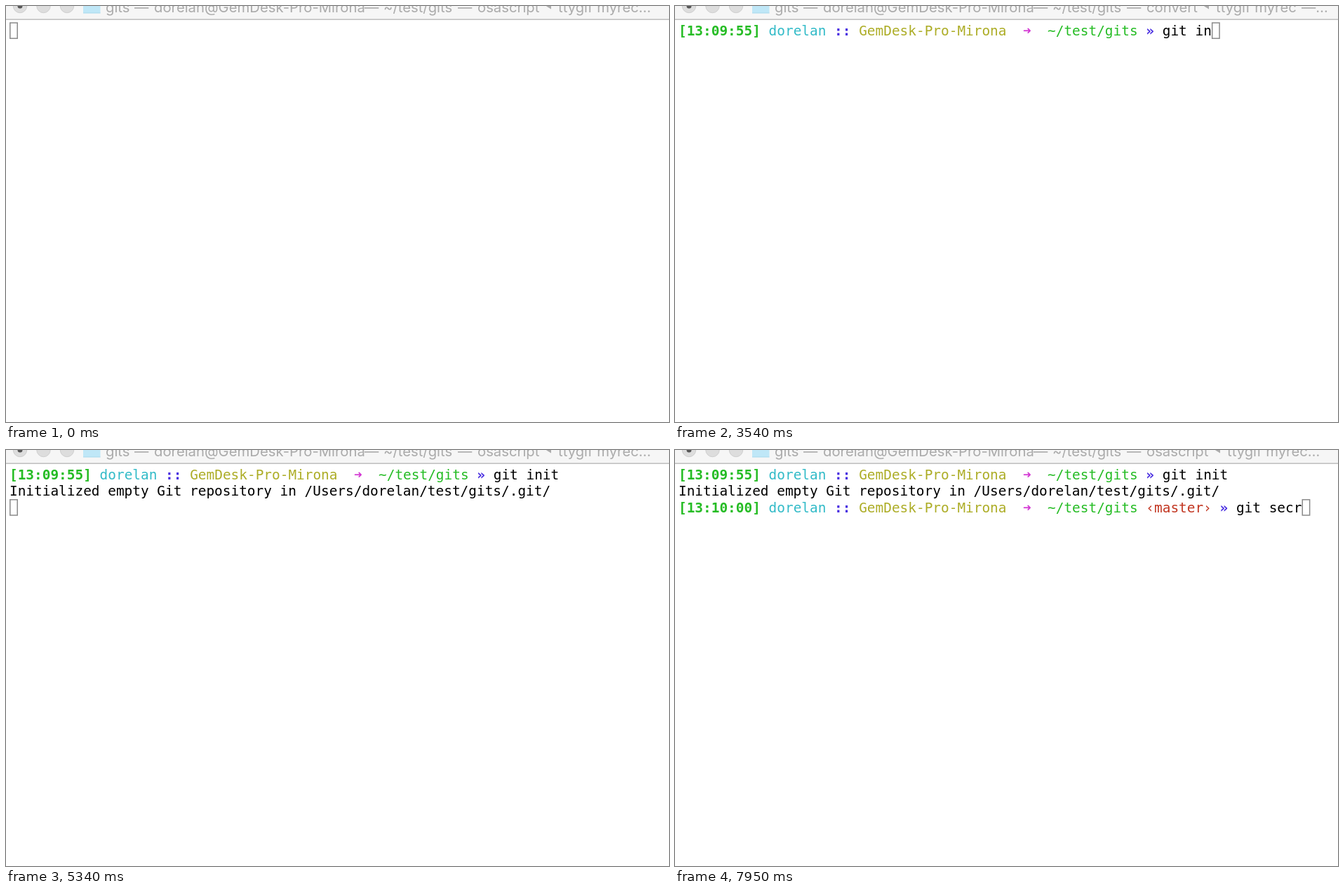
Animation of 945x593 px, one loop 8 s. Source, as an HTML page with a canvas:

```html
<!DOCTYPE html>
<html lang="en">
<head>
<meta charset="utf-8">
<title>Terminal session</title>
<style>
  html, body { margin: 0; width: 100%; height: 100%; overflow: hidden; background: #fff; }
  canvas { display: block; width: 945px; height: 593px; }
</style>
</head>
<body>
<canvas id="stage"></canvas>
<script>
const LOOP = 8000, WIDTH = 945, HEIGHT = 593;
const LEFT = 5, CELL = 11.69, ROW = 23.4;
const USER = 'dorelan', HOST = 'GemDesk-Pro-Mirona';
const MONO = '19.42px "DejaVu Sans Mono", monospace';
const SANS = '20.3px Inter, sans-serif';
const COLOR = {
  green: '#25bc24', cyan: '#33bbc8', blue: '#492ee1', yellow: '#adad27',
  magenta: '#d338d3', red: '#c23621', black: '#000'
};

const canvas = document.getElementById('stage');
const ctx = canvas.getContext('2d');
const ratio = window.devicePixelRatio || 1;
canvas.width = WIDTH * ratio;
canvas.height = HEIGHT * ratio;

// Each schedule lists [start time, value]; the last one reached applies.
const titleSchedule = [
  [0, 'osascript'], [2780, 'convert'], [2950, 'osascript'], [3160, 'sh'],
  [3540, 'convert'], [3710, 'osascript'], [3830, 'convert'], [4120, 'sh'],
  [4840, 'osascript'], [4940, 'init'], [5040, 'osascript'], [5660, 'convert'],
  [6490, 'sh'], [6680, 'convert'], [6870, 'osascript'], [7100, 'convert'],
  [7380, 'osascript'], [7660, 'convert'], [7950, 'osascript']
];
const firstCommand = { text: 'git init', keys: [300, 2780, 2950, 3160, 3360, 3540, 3710, 3830] };
const secondCommand = { text: 'git secr', keys: [5660, 6490, 6680, 6870, 7100, 7380, 7660, 7950] };

// Window titles: text pieces with their x, and the x of the small arrow.
const place = [[142, 'gits'], [183, '—'], [211, `${USER}@${HOST}`],
  [511, '—'], [538, '~/test/gits'], [644, '—']];
const titles = {
  osascript: { folder: 110, arrow: 769, parts: [...place, [672, 'osascript'], [787, 'ttygif myrec…']] },
  convert: { folder: 110, arrow: 753, parts: [...place, [672, 'convert'], [771, 'ttygif myrec'], [893, '—…']] },
  sh: { folder: 110, arrow: 702, parts: [...place, [672, 'sh'], [720, 'ttygif myrec'], [842, '—'], [870, '80×…']] },
  init: { folder: 171, arrow: 531, parts: [[204, 'gits'], [247, '—'], [275, 'git init'], [343, '—'],
    [371, 'git'], [402, '—'], [430, 'osascript'], [548, 'ttygif myrec'], [675, '—'], [703, '80×24']] }
};

const valueAt = (schedule, time) => schedule.filter(([start]) => start <= time).pop()[1];
const typed = ({ text, keys }, time) => text.slice(0, keys.filter(key => key <= time).length);

function drawTitleBar(title) {
  ctx.fillStyle = '#f6f6f6';
  ctx.fillRect(0, 0, WIDTH, 18.5);
  ctx.fillStyle = '#b2b2b2';
  ctx.fillRect(0, 18.5, WIDTH, 1.3);

  for (const x of [20, 53.5, 87]) {
    ctx.beginPath();
    ctx.arc(x, 0, 9.7, 0, Math.PI * 2);
    ctx.fillStyle = '#dddddd';
    ctx.fill();
    ctx.strokeStyle = '#cecece';
    ctx.lineWidth = 1;
    ctx.stroke();
  }
  ctx.fillStyle = '#555';
  ctx.beginPath();
  ctx.arc(20, 0, 3.5, 0, Math.PI * 2);
  ctx.fill();

  ctx.fillStyle = '#bfe7f7';
  ctx.fillRect(title.folder, 0, 24.5, 10.3);
  ctx.fillStyle = '#a9d7ea';
  ctx.fillRect(title.folder, 9.5, 24.5, 0.9);

  ctx.fillStyle = '#ababab';
  ctx.font = SANS;
  for (const [x, text] of title.parts) ctx.fillText(text, x, 8.6);
  ctx.beginPath();
  ctx.moveTo(title.arrow, -0.5);
  ctx.lineTo(title.arrow + 8, -5.5);
  ctx.lineTo(title.arrow + 8, 4.5);
  ctx.fill();
}

// Writes text on the character grid and returns the column after it.
function write(text, column, row, color = 'black', bold = false) {
  ctx.font = (bold ? 'bold ' : '') + MONO;
  ctx.fillStyle = COLOR[color];
  ctx.fillText(text, LEFT + column * CELL, 42 + row * ROW);
  return column + text.length;
}

function drawPrompt(row, clock, branch, command) {
  const parts = [
    [`[${clock}] `, 'green', true], [`${USER} `, 'cyan'], [':: ', 'blue', true],
    [`${HOST}  `, 'yellow'], ['➜  ', 'magenta', true], ['~/test/gits ', 'green'],
    [branch, 'red'], ['» ', 'blue', true], [command]
  ];
  return parts.reduce((column, [text, color, bold]) => write(text, column, row, color, bold), 0);
}

function drawCursor(column, row) {
  ctx.strokeStyle = '#8a8a8a';
  ctx.lineWidth = 1.5;
  ctx.strokeRect(LEFT + column * CELL + 0.8, 24 + row * ROW, 10.4, 22.2);
}

function draw(time) {
  ctx.setTransform(ratio, 0, 0, ratio, 0, 0);
  ctx.fillStyle = '#fff';
  ctx.fillRect(0, 0, WIDTH, HEIGHT);
  drawTitleBar(titles[valueAt(titleSchedule, time)]);

  let column = 0, row = 0;
  if (time >= 100) column = drawPrompt(0, '13:09:55', '', typed(firstCommand, time));
  if (time >= 4840) [column, row] = [0, 1];
  if (time >= 4940) {
    write(`Initialized empty Git repository in /Users/${USER}/test/gits/.git/`, 0, 1);
    row = 2;
  }
  if (time >= 5540) column = drawPrompt(2, '13:10:00', '‹master› ', typed(secondCommand, time));
  drawCursor(column, row);
}

const start = performance.now();
function tick() {
  draw((performance.now() - start) % LOOP);
  requestAnimationFrame(tick);
}
tick();
</script>
</body>
</html>
```
